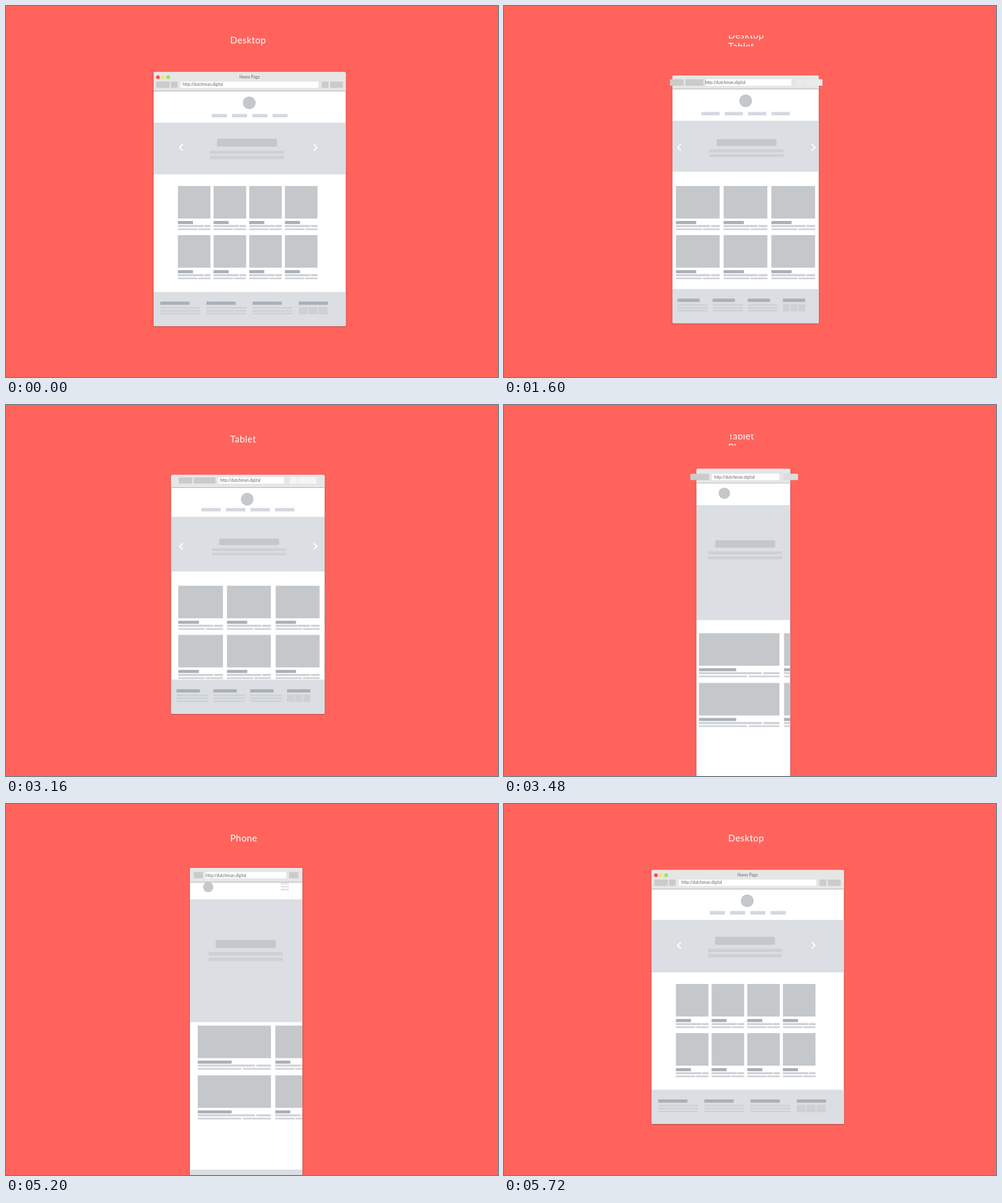
An HTML page with a canvas for the animation above (5.76 s loop, 800x604 px).

```html
<!DOCTYPE html>
<html lang="en">
<head>
<meta charset="utf-8">
<title>Responsive wireframe</title>
<style>
  html, body { margin: 0; width: 100%; height: 100%; overflow: hidden; background: #ff635c; }
  canvas { display: block; width: 800px; height: 604px; }
</style>
</head>
<body>
<canvas id="stage"></canvas>
<script>
const LOOP = 5760, STEP = 40, SHIFT = 960;
const STARTS = [950, 2880, 4782];
const LABELS = ['Desktop', 'Tablet', 'Phone'];
const FONT = 'Lato, "Open Sans", sans-serif';
const C = {
  bg: '#ff635c', bar: '#e6e6e6', button: '#cbcbcb', block: '#c4c8cb', heading: '#aab0b5',
  line: '#ced2d7', panel: '#dbdee2', faint: '#cdd1d5', nav: '#d4d8df', text: '#666'
};

const canvas = document.getElementById('stage');
const ctx = canvas.getContext('2d');
const ratio = window.devicePixelRatio || 1;
canvas.width = 800 * ratio;
canvas.height = 604 * ratio;

let from = 0, to = 0, progress = 0;

const clamp = v => Math.min(1, Math.max(0, v));
const ramp = (v, a, b) => clamp((v - a) / (b - a));

// Symmetric ease built from one half curve.
const inOut = (half, delay = 0, span = 1) => t => {
  const u = 2 * clamp((t - delay) / span);
  return u < 1 ? half(u) / 2 : 1 - half(2 - u) / 2;
};
const power = (n, delay, span) => inOut(x => x ** n, delay, span);
const back = inOut(x => x * x * (3.595 * x - 2.595));
const glide = power(6.5), panel = power(5, 0.04), slow = power(2, 0.1);
const tools = power(3, 0.085), late = power(3, 0.36, 0.52);

// Values are given for desktop, tablet and phone.
function mix(ease, ...values) {
  const k = ease(progress), a = values[from], b = values[to];
  return Array.isArray(a) ? a.map((v, i) => v + (b[i] - v) * k) : a + (b - a) * k;
}

function shown(layouts, out = [0.34, 0.55]) {
  const a = layouts[from], b = layouts[to];
  if (a === b) return a;
  return a ? 1 - ramp(progress, ...out) : ramp(progress, 0.65, 0.9);
}

function times(n, draw) {
  for (let i = 0; i < n; i++) draw(i);
}

function rect(x, y, w, h, color, r = 0) {
  ctx.fillStyle = color;
  ctx.beginPath();
  ctx.roundRect(x, y, w, h, r);
  ctx.fill();
}

function disc(x, y, r, color) {
  ctx.fillStyle = color;
  ctx.beginPath();
  ctx.arc(x, y, r, 0, Math.PI * 2);
  ctx.fill();
}

function text(str, x, y, size, color) {
  ctx.font = `${size}px ${FONT}`;
  ctx.fillStyle = color;
  ctx.fillText(str, x, y);
}

function faded(alpha, draw) {
  if (alpha <= 0) return;
  ctx.save();
  ctx.globalAlpha = alpha;
  draw();
  ctx.restore();
}

function clipped(x, y, w, h, draw) {
  ctx.save();
  ctx.beginPath();
  ctx.rect(x, y, w, h);
  ctx.clip();
  draw();
  ctx.restore();
}

function drawLabel() {
  const u = ramp(progress, 0.5, 0.875);
  const position = from + (to - from) * u * u * (3 - 2 * u);
  clipped(340, 48, 120, 18, () => {
    ctx.letterSpacing = '0.4px';
    LABELS.forEach((name, i) => text(name, 364.5, 61 + (i - position) * 18, 15, '#fff'));
    ctx.letterSpacing = '0px';
  });
}

function drawHeader(center, heroTop) {
  disc(...mix(late, [395.5, 157.7, 10.4], [392.2, 153.4, 10.4], [328, 135, 8.3]), C.block);
  faded(shown([1, 1, 0]), () => {
    const w = mix(tools, 24.5, 31.5, 31.5), pitch = w + 8.4;
    times(4, i => rect(center + (i - 1.5) * pitch - w / 2, heroTop - 14.3, w, 5.6, C.nav));
  });
  faded(shown([0, 0, 1]), () => times(3, i => rect(447, 128.6 + i * 4.7, 13, 2.5, C.block)));
}

function chevron(x, dir) {
  ctx.strokeStyle = '#fff';
  ctx.lineWidth = 2;
  ctx.beginPath();
  ctx.moveTo(x + 2.7 * dir, 225);
  ctx.lineTo(x - 2.7 * dir, 230.2);
  ctx.lineTo(x + 2.7 * dir, 235.4);
  ctx.stroke();
}

function drawHero(x, w, top) {
  rect(x, top, w, mix(panel, 274, 269.3, 370) - top, C.panel);
  const [center, y, scale] = mix(slow, [391.8, 216, 1], [395.8, 217, 0.8], [389.1, 222.8, 1.03]);
  rect(center - 48.8, y, 97.6, 13 * scale, C.block, 1.5);
  times(2, i => rect(center - 60.3, y + (19.4 + i * 8.7) * scale, 120.6, 5.4 * scale, C.faint));
  faded(shown([1, 1, 0]), () => {
    chevron(285, 1);
    chevron(503, -1);
  });
}

function drawCard(x, y, w) {
  const splitLine = (top, h, end, start) => {
    rect(x, top, w * end, h, C.line);
    rect(x + w * start, top, w * (1 - start), h, C.line);
  };
  rect(x, y, w, 53, C.block);
  rect(x, y + 57, w * 0.463, 5, C.heading);
  splitLine(y + 63.5, 3.4, 0.78, 0.8);
  splitLine(y + 69, 2.8, 0.595, 0.617);
}

function drawCards() {
  const [x, y, pitch, rowPitch] = mix(glide, [279.5, 293, 58, 80], [279.5, 293, 78.2, 80], [320, 378, 143.5, 81.2]);
  times(4, i => {
    const w = mix(glide, 53, 71.7, i ? 53 : 136);
    times(2, row => drawCard(x + i * pitch, y + row * rowPitch, w));
  });
  faded(shown([0, 0, 1], [0, 0.3]), () => drawCard(x + 1, y + 2 * rowPitch, 134));
}

// Footer columns scale with the window width.
function drawFooter(x, w, bottom) {
  const top = bottom - 55.7, box = w * 0.047;
  rect(x, top, w, 56, C.panel);
  times(4, i => {
    const left = x + w * (0.035 + i * 0.24);
    rect(left, top + 15.7, w * 0.152, 5.3, C.heading);
    times(3, j => {
      if (i < 3) rect(left, top + 24.6 + j * 4.7, w * 0.207, 2.5, C.faint);
      else rect(left + j * (box + 1.4), top + 24.6, box, 11.9, C.faint);
    });
  });
}

function drawToolbar(x, y, w) {
  const bottom = mix(panel, 138.8, 135, 125.6);
  rect(x, y, w, bottom - y, C.bar, [2, 2, 0, 0]);
  rect(x, bottom - 0.8, w, 0.9, '#b3b3b3');

  const top = mix(tools, 123, 118, 108.2);
  const tone = mix(tools, 203, 247, 203);
  const pale = `rgb(${tone},${tone},${tone})`;
  const field = (color, ...spans) => {
    const [left, width] = mix(tools, ...spans);
    rect(left, top, width, 10.3, color, 1);
  };
  field(C.button, [244, 22], [279.5, 22.5], [318, 11]);
  field(C.button, [268, 11], [305, 36], [318, 11]);
  field(pale, [513.3, 11], [462, 12], [449, 11]);
  field(pale, [527, 21], [476, 30.5], [449, 11]);
  field('#fff', [284, 224], [345.5, 106.5], [332.8, 112]);

  text('http://dutchman.digital', ...mix(slow, [287.3, 130.4], [349, 125.4], [336, 115.6]), 6.6, C.text);
  faded(shown([1, 0, 0]), () => {
    ['#ff4a45', '#ffe45c', '#8fe563'].forEach((color, i) => disc(247 + i * 8.3, 116, 3, color));
    text('Home Page', 379.4, 118.4, 6.6, C.text);
  });
}

function drawWindow() {
  const [x, y, right, bottom] = mix(back, [240, 107.6, 552.5, 521.3], [272, 113, 514, 516.8], [314, 103.5, 464, 684]);
  const w = right - x, h = bottom - y;
  const heroTop = mix(slow, 190, 185, 145);
  ctx.save();
  ctx.shadowColor = 'rgba(0,0,0,.5)';
  ctx.shadowBlur = 2 * ratio;
  ctx.shadowOffsetY = 0.5 * ratio;
  rect(x, y, w, h, '#fff', 2);
  ctx.restore();
  clipped(x, y, w, h, () => {
    drawHeader(x + w / 2, heroTop);
    drawHero(x, w, heroTop);
    drawFooter(x, w, bottom);
    drawCards();
  });
  drawToolbar(x, y, w);
}

function setTime(ms) {
  const index = STARTS.findLastIndex(start => ms >= start);
  from = Math.max(0, index);
  to = (index + 1) % 3;
  progress = index < 0 ? 0 : (ms - STARTS[index]) / SHIFT;
}

const origin = performance.now();
function frame() {
  const ms = Math.max(0, performance.now() - origin) % LOOP;
  setTime(Math.floor(ms / STEP) * STEP);
  ctx.setTransform(ratio, 0, 0, ratio, 0, 0);
  rect(0, 0, 800, 604, C.bg);
  drawLabel();
  drawWindow();
  requestAnimationFrame(frame);
}
frame();
</script>
</body>
</html>
```
